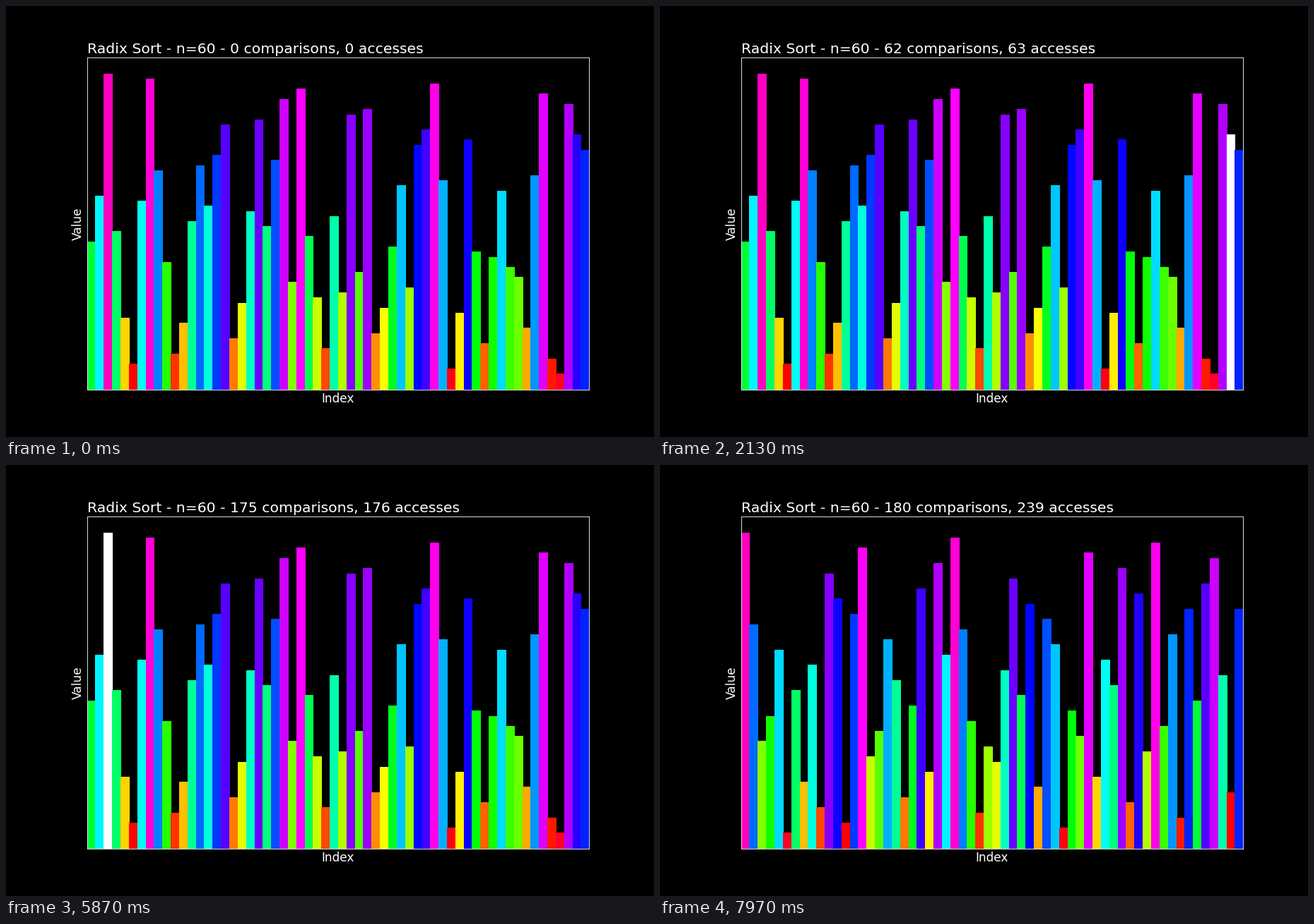
A matplotlib script that plays this animation: 917x611 px, repeating every 8000 ms.

```python
import numpy as np
import matplotlib.pyplot as plt
from matplotlib.animation import FuncAnimation

N = 60
FRAMES = 240
LOOP_MS = 8000
DPI = 76.4
READS = 3 * N  # one counting pass, then two reads per item while placing

plt.style.use("dark_background")
plt.rcParams.update({"font.family": "DejaVu Sans", "font.size": 16})

# Shuffled values and the result of a counting sort on the last digit
start = np.round(np.linspace(50, 1000, N))
np.random.seed(0)
np.random.shuffle(start)
placed = start[np.argsort(start % 10, kind="stable")]

cmap = plt.get_cmap("gist_rainbow")
norm = plt.Normalize(start.min(), start.max())

fig, ax = plt.subplots(
    figsize=((917 + 1e-6) / DPI, (611 + 1e-6) / DPI), dpi=DPI
)
bars = ax.bar(np.arange(N), start, width=1, align="edge")
ax.set_xlim(0, N)
ax.set_ylim(0, start.max() * 1.05)
ax.set(xlabel="Index", ylabel="Value", xticks=[], yticks=[])
title = ax.set_title("", loc="left")


def active_bar(step):
    """Index and colour of the bar being read or written."""
    if step == 0:
        return None, None
    if step <= N:
        return step - 1, "white"
    if step <= READS:
        return N - 1 - (step - N - 1) // 2, "white"
    return step - READS - 1, "red"


def draw(step):
    written = max(0, step - READS)
    values = np.concatenate([placed[:written], start[written:]])
    active, mark = active_bar(step)
    for i, (bar, value) in enumerate(zip(bars, values)):
        bar.set_height(value)
        bar.set_color(mark if i == active else cmap(norm(value)))
    comparisons = min(max(step - 1, 0), READS)
    title.set_text(
        f"Radix Sort - n={N} - {comparisons} comparisons, {step} accesses"
    )
    return [*bars, title]


anim = FuncAnimation(
    fig,
    draw,
    frames=FRAMES,
    init_func=lambda: draw(0),
    interval=LOOP_MS / FRAMES,
    repeat=True,
    repeat_delay=0,
    blit=False,
)
plt.show()
```
